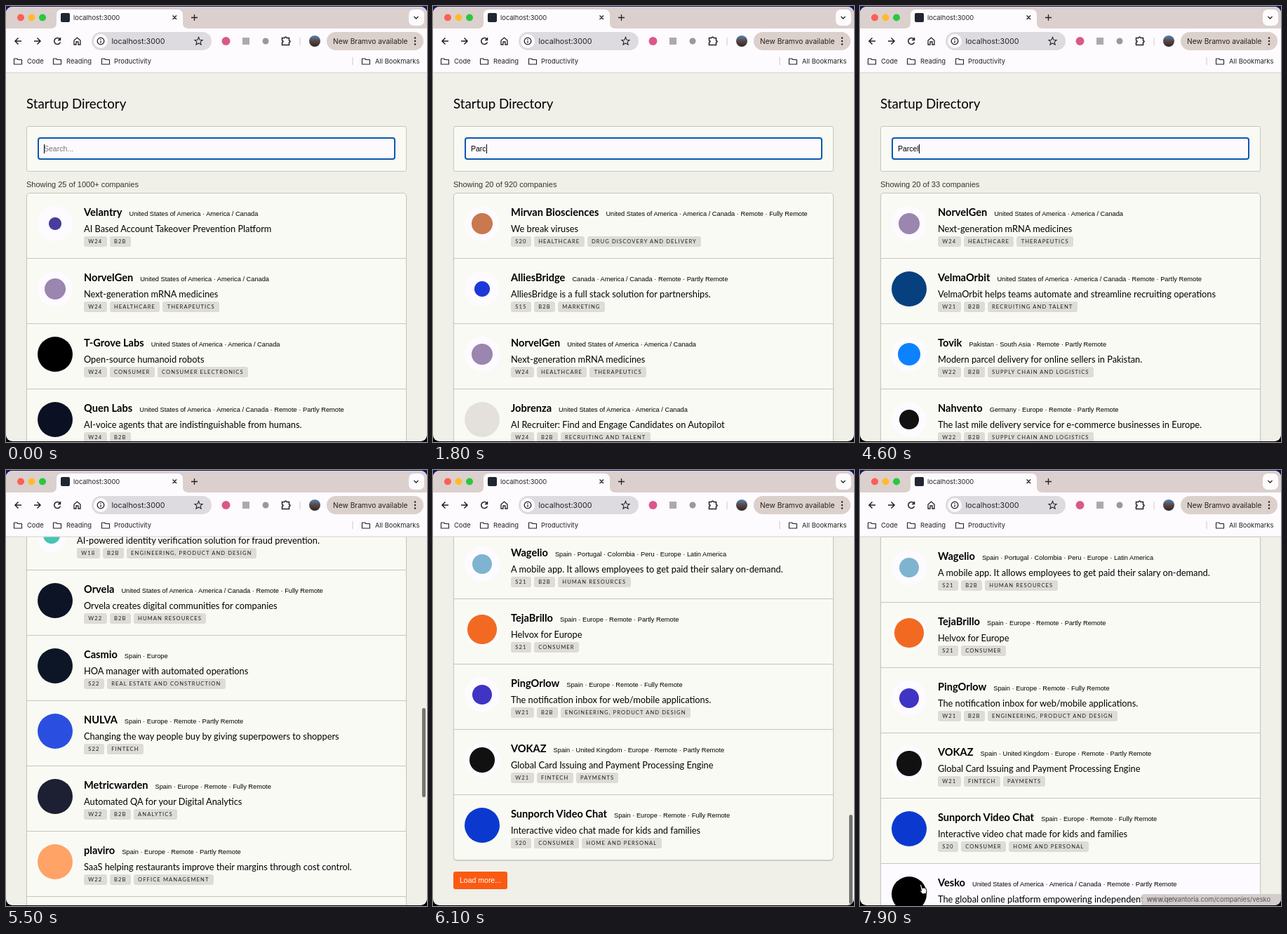
These frames come from a looping animation (600x621 px, 8 s). An HTML page:

```html
<!DOCTYPE html>
<html lang="en">
<head>
<meta charset="utf-8">
<title>Startup Directory</title>
<style>
html, body { margin: 0; width: 100%; height: 100%; overflow: hidden; background: linear-gradient(#16185f 50%, #000 50%); }
#win { position: absolute; left: 0; top: 0; width: 600px; height: 621px; overflow: hidden; background: #f0f0e8;
  clip-path: inset(1px 0 1px round 9px); font: 11px "Liberation Sans", Arial, sans-serif; color: #000; }
#win svg { position: absolute; left: 0; top: 0; }
#bar text { font-family: Inter, sans-serif; font-size: 9.4px; fill: #222; }
#view { position: absolute; left: 0; top: 95px; width: 600px; height: 526px; overflow: hidden; }
#page { position: absolute; left: 0; top: -95px; width: 600px; }
#page > * { position: absolute; box-sizing: border-box; }
.lato { font-family: Lato, sans-serif; }
h1 { margin: 0; left: 29px; top: 128px; font-size: 18.7px; font-weight: 400; line-height: 22px; }
.card { left: 29px; width: 542px; border: 1px solid #c6c6c1; background: #fafaf4; }
#search { top: 171px; height: 65px; border-radius: 3px; }
#input { left: 45px; top: 187px; width: 510px; height: 32px; border: 2px solid #0c58b2; border-radius: 4px;
  background: #fcfaff; padding-left: 7px; font-size: 10.5px; line-height: 28px; white-space: pre; }
#caret { display: inline-block; width: 1px; height: 13px; margin-right: -1px; background: #000; vertical-align: -3px; }
#hint { color: #757575; }
#count { left: 29px; top: 246px; line-height: 16px; color: #333; }
#results { top: 266px; border-radius: 5px; box-shadow: 0 1px 1px #0002; overflow: hidden; }
.row { position: relative; height: 93px; box-sizing: border-box; border-bottom: 1px solid #c6c6c1; white-space: nowrap; }
.row:last-child { height: 92px; border: 0; }
.row > * { position: absolute; left: 81px; }
.row.small > * { left: 71px; }
.row.hover { background: #fdfbff; }
.row .logo { left: 15px; top: 18px; width: 50px; height: 50px; border-radius: 50%; background: #fdfbff; }
.row.small .logo { width: 40px; }
.name { top: 16.5px; line-height: 20px; font-size: 14.6px; }
.name small { font: 9.27px "Liberation Sans", Arial, sans-serif; margin-left: 10px; }
.desc { top: 39.5px; font-size: 12.8px; line-height: 20px; }
.tags { top: 60.5px; display: flex; gap: 4px; }
.tags span { height: 15px; padding: 0 6.3px; border-radius: 3px; background: #dedcd7; color: #222;
  font-size: 7.6px; line-height: 15px; letter-spacing: 1.1px; }
#more { left: 29px; width: 77px; height: 25px; border-radius: 3px; background: #fb5a12; color: #fff;
  font-size: 10.5px; line-height: 25px; text-align: center; }
#thumb { position: absolute; left: 593px; width: 5px; height: 127px; border-radius: 3px; background: #757571; }
#status { position: absolute; left: 401px; top: 604px; width: 199px; height: 17px; box-sizing: border-box; padding-left: 8px;
  border-radius: 4px 0 0; background: #cfc8c6; color: #444; font: 9.3px/16px Inter, sans-serif; white-space: nowrap; }
</style>
</head>
<body>
<div id="win">
  <div id="view"><div id="page">
    <h1 class="lato">Startup Directory</h1>
    <div id="search" class="card"></div>
    <div id="input"><span id="query"></span><i id="caret"></i><span id="hint">Search...</span></div>
    <div id="count"></div>
    <div id="results" class="card"></div>
    <div id="more">Load more...</div>
  </div></div>
  <svg id="bar" width="600" height="96" fill="none" stroke="#222" stroke-width="1.3">
    <defs>
      <path id="folder" d="M-5.5 -4h4l1.5 1.5h5.5v6.5h-11z" stroke-width="1.1" stroke-linejoin="round"/>
      <linearGradient id="photo" x2="0" y2="1"><stop stop-color="#4b86bd"/><stop offset=".5" stop-color="#5b4540"/><stop offset="1" stop-color="#29262c"/></linearGradient>
    </defs>
    <g stroke="none">
      <path fill="#dbd0cd" d="M0 0h600v40H0z"/>
      <path fill="#fdfbfd" d="M0 32h64q8 0 8-8V13q0-8 8-8h164q8 0 8 8v11q0 8 8 8h340v63H0z"/>
      <path fill="#d6d0ce" d="M0 94.5h600v1H0z"/>
      <circle cx="21" cy="16.5" r="5" fill="#fe5f57"/><circle cx="36.5" cy="16.5" r="5" fill="#febc2e"/><circle cx="52" cy="16.5" r="5" fill="#28c840"/>
      <rect x="78" y="10" width="13" height="13" rx="2" fill="#20262f"/>
      <rect x="574" y="5" width="22" height="23" rx="7" fill="#fdfbfd"/>
      <rect x="122" y="37" width="171" height="26" rx="13" fill="#dedbe0"/>
      <circle cx="135" cy="50" r="10" fill="#fdfbfd"/>
      <circle cx="313.500" cy="50" r="6" fill="#d9588c"/>
      <rect x="337" y="45" width="10" height="10" fill="#aaa"/><circle cx="370" cy="50" r="4.500" fill="#999"/>
      <circle cx="440" cy="50" r="8" fill="url(#photo)"/>
      <rect x="457" y="37" width="138" height="26" rx="13" fill="#dbd0cc"/>
      <g fill="#222"><circle cx="583" cy="45.500" r="1.200"/><circle cx="583" cy="50" r="1.200"/><circle cx="583" cy="54.500" r="1.200"/></g>
      <path fill="#ccc5c8" d="M418.500 45h1v11h-1zM493.500 73h1v11h-1z"/>
    </g>
    <path d="M237.500 13.500l5.500 5.500m0-5.500l-5.500 5.500M264 16.500h9m-4.500-4.500v9M581.500 15l3 3 3-3"/>
    <path stroke-width="1.500" d="M22 50h-9m4.500-4.500L13 50l4.500 4.500M40 50h9m-4.500-4.500L49 50l-4.500 4.500M77 47.500a4.500 4.500 0 1 0 .5 4M77.500 45v3.500h-3.500"/>
    <path d="M97 49l4.500-4 4.500 4v6h-3v-4h-3v4h-3z"/>
    <circle cx="135" cy="50" r="4.800"/><path d="M135 49.500v3.200m0-5.700v1.200"/>
    <path stroke-width="1.100" d="M274.500 44.500l1.600 3.700 4 .3-3 2.700 1 4-3.600-2.200-3.600 2.200 1-4-3-2.700 4-.3z"/>
    <path stroke-width="1.500" d="M393.500 45.500h3.500q1.500-3 3 0h3.500v3.500q3 1.500 0 3v3.500h-10v-3.500q3-1.500 0-3z"/>
    <use href="#folder" x="17" y="79"/><use href="#folder" x="73" y="79"/><use href="#folder" x="142" y="79"/><use href="#folder" x="513" y="79"/>
    <g stroke="none">
      <text x="96" y="20">localhost:3000</text>
      <text x="150.500" y="54" style="font-size:10.75px">localhost:3000</text>
      <text x="466" y="53.500" style="font-size:10.2px">New Bramvo available</text>
      <text x="30" y="82">Code</text><text x="86" y="82">Reading</text><text x="154" y="82">Productivity</text><text x="526" y="82">All Bookmarks</text>
    </g>
  </svg>
  <div id="thumb"></div>
  <div id="status">www.qelvantoria.com/companies/vesko</div>
  <svg id="pointer" width="18" height="22" stroke="#fff" stroke-linejoin="round">
    <path id="arrow" d="M1 1v11.500l2.700-2.400 1.700 3.900 2-.9-1.700-3.800h3.500z"/>
    <path id="hand" fill="#fff" stroke="#000" d="M2.500 2q1.200-1.200 2.200.2l1 4.300 2-.4 1.800.5 1.600.8.8 3.200-.6 3.700-5 .7-4-4.500q.2-1.500 2.200 0z"/>
  </svg>
</div>
<script>
const $ = id => document.getElementById(id);
const US = 'United States of America · America / Canada', ES = 'Spain · Europe';
const PART = ' · Remote · Partly Remote', FULL = ' · Remote · Fully Remote';
const ENG = 'ENGINEERING, PRODUCT AND DESIGN', SHIP = 'SUPPLY CHAIN AND LOGISTICS', HIRE = 'RECRUITING AND TALENT';

// [disc or mark colour, mark radius (0 = full disc), name, place, description, tags]
const bio = ['#9a86ae', 15, 'NorvelGen', US, 'Next-generation mRNA medicines', 'W24|HEALTHCARE|THERAPEUTICS'];
const START = [
  ['#4a3c9c', 9, 'Velantry', US, 'AI Based Account Takeover Prevention Platform', 'W24|B2B'],
  bio,
  ['#000', 0, 'T-Grove Labs', US, 'Open-source humanoid robots', 'W24|CONSUMER|CONSUMER ELECTRONICS'],
  ['#0b1122', 0, 'Quen Labs', US + PART, 'AI-voice agents that are indistinguishable from humans.', 'W24|B2B']
];
const PARTIAL = [
  ['#c9784f', 15, 'Mirvan Biosciences', US + FULL, 'We break viruses', 'S20|HEALTHCARE|DRUG DISCOVERY AND DELIVERY'],
  ['#1d38d8', 11, 'AlliesBridge', 'Canada · America / Canada' + PART, 'AlliesBridge is a full stack solution for partnerships.', 'S15|B2B|MARKETING'],
  bio,
  ['#e4e1dd', 0, 'Jobrenza', US, 'AI Recruiter: Find and Engage Candidates on Autopilot', 'W24|B2B|' + HIRE]
];
const FOUND = [
  bio,
  ['#07407f', 0, 'VelmaOrbit', US + PART, 'VelmaOrbit helps teams automate and streamline recruiting operations', 'W21|B2B|' + HIRE],
  ['#0d82ff', 16, 'Tovik', 'Pakistan · South Asia' + PART, 'Modern parcel delivery for online sellers in Pakistan.', 'W22|B2B|' + SHIP],
  ['#111', 14, 'Nahvento', 'Germany · Europe' + PART, 'The last mile delivery service for e-commerce businesses in Europe.', 'W22|B2B|' + SHIP],
  ['#2c6e5a', 0, 'Ombrello', ES + PART, 'Simple stock planning for online shops', 'S21|B2B'],
  ['#e8b13c', 15, 'Tarvio', ES, 'Online lessons for small teams', 'W20|CONSUMER'],
  ['#22243c', 0, 'Quenda', ES + FULL, 'Accounting tools for growing companies', 'S22|FINTECH'],
  ['#d8553e', 14, 'Bolvera', ES + PART, 'Better scheduling for clinics', 'W21|HEALTHCARE'],
  ['#45c4b4', 12, 'Idrenna', ES + PART, 'AI-powered identity verification solution for fraud prevention.', 'W18|B2B|' + ENG, 'small'],
  ['#0d1426', 0, 'Orvela', US + FULL, 'Orvela creates digital communities for companies', 'W22|B2B|HUMAN RESOURCES'],
  ['#0c1626', 0, 'Casmio', ES, 'HOA manager with automated operations', 'S22|REAL ESTATE AND CONSTRUCTION'],
  ['#2a4fe0', 0, 'NULVA', ES + PART, 'Changing the way people buy by giving superpowers to shoppers', 'S22|FINTECH'],
  ['#1d1f33', 0, 'Metricwarden', ES + FULL, 'Automated QA for your Digital Analytics', 'W22|B2B|ANALYTICS'],
  ['#ffa366', 0, 'plaviro', ES + PART, 'SaaS helping restaurants improve their margins through cost control.', 'W22|B2B|OFFICE MANAGEMENT'],
  ['#5a4ad0', 15, 'Lumetra', ES + FULL, 'Customer feedback for modern teams', 'S21|B2B'],
  ['#7fb4d0', 14, 'Wagelio', 'Spain · Portugal · Colombia · Peru · Europe · Latin America', 'A mobile app. It allows employees to get paid their salary on-demand.', 'S21|B2B|HUMAN RESOURCES'],
  ['#f26a21', 21, 'TejaBrillo', ES + PART, 'Helvox for Europe', 'S21|CONSUMER'],
  ['#3f34c4', 14, 'PingOrlow', ES + FULL, 'The notification inbox for web/mobile applications.', 'W21|B2B|' + ENG],
  ['#111', 18, 'VOKAZ', 'Spain · United Kingdom · Europe' + PART, 'Global Card Issuing and Payment Processing Engine', 'W21|FINTECH|PAYMENTS'],
  ['#0b39d0', 0, 'Sunporch Video Chat', ES + FULL, 'Interactive video chat made for kids and families', 'S20|CONSUMER|HOME AND PERSONAL']
];
const MORE = [...FOUND,
  ['#000', 0, 'Vesko', US + PART, 'The global online platform empowering independent retailers', 'W17|B2B', 'hover']];

const STAGES = [[0, START, '25 of 1000+'], [1500, PARTIAL, '20 of 920'], [2700, FOUND, '20 of 33'], [7400, MORE, '33 of 33']];
const KEYS = [900, 1200, 1500, 1800, 2100, 2400];
const SCROLL = [[5200, 0], [5300, 140], [5400, 520], [5500, 961], [5600, 1290], [5700, 1500], [5800, 1593], [6000, 1576], [6200, 1566]];
const PATH_X = [[6200, 170], [6400, 109], [6700, 83], [7900, 83]];
const PATH_Y = [[6200, 560], [6400, 580], [6700, 589], [7900, 589]];
const MAX_SCROLL = 1566;

function at(points, t) {
  let prev = points[0];
  for (const p of points) {
    if (t < p[0]) return p === prev ? p[1] : prev[1] + (p[1] - prev[1]) * (t - prev[0]) / (p[0] - prev[0]);
    prev = p;
  }
  return prev[1];
}

function rowHTML([color, r, name, place, desc, tags, kind = '']) {
  const fill = r ? `radial-gradient(circle,${color} ${r - .5}px,#fdfbff ${r + .5}px)` : color;
  return `<div class="row lato ${kind}"><i class="logo" style="background:${fill}"></i>
    <div class="name"><b>${name}</b><small>${place}</small></div><div class="desc">${desc}</div>
    <div class="tags">${tags.split('|').map(s => `<span>${s}</span>`).join('')}</div></div>`;
}

let shown;
function showStage(stage) {
  if (stage === shown) return;
  shown = stage;
  const [, rows, count] = stage;
  $('results').innerHTML = rows.map(rowHTML).join('');
  $('count').textContent = `Showing ${count} companies`;
  $('more').style.top = 266 + rows.length * 93 + 17 + 'px';
}

const show = (id, on) => $(id).style.visibility = on ? 'visible' : 'hidden';

function draw(now) {
  const t = Math.floor(now % 8000 / 100) * 100;
  showStage(STAGES.findLast(s => t >= s[0]));

  const typed = KEYS.filter(k => t >= k).length;
  $('query').textContent = 'Parcel'.slice(0, typed);
  show('hint', !typed);
  show('caret', Math.floor((t - (typed ? KEYS[typed - 1] : 0)) / 500) % 2 === 0);

  const y = at(SCROLL, t);
  $('page').style.transform = `translateY(${-Math.round(y)}px)`;
  $('thumb').style.top = 97 + 394 * Math.min(1, y / MAX_SCROLL) + 'px';
  show('thumb', t >= 5300 && t < 6300);

  show('pointer', t >= 6200);
  $('pointer').style.transform = `translate(${at(PATH_X, t)}px,${at(PATH_Y, t)}px)`;
  const over = t >= 7400;
  $('arrow').style.display = over ? 'none' : '';
  $('hand').style.display = over ? '' : 'none';
  $('status').style.opacity = at([[7700, 0], [7900, .88]], t);
  requestAnimationFrame(draw);
}
const start = performance.now();
requestAnimationFrame(now => draw(Math.max(0, now - start)));
</script>
</body>
</html>
```
